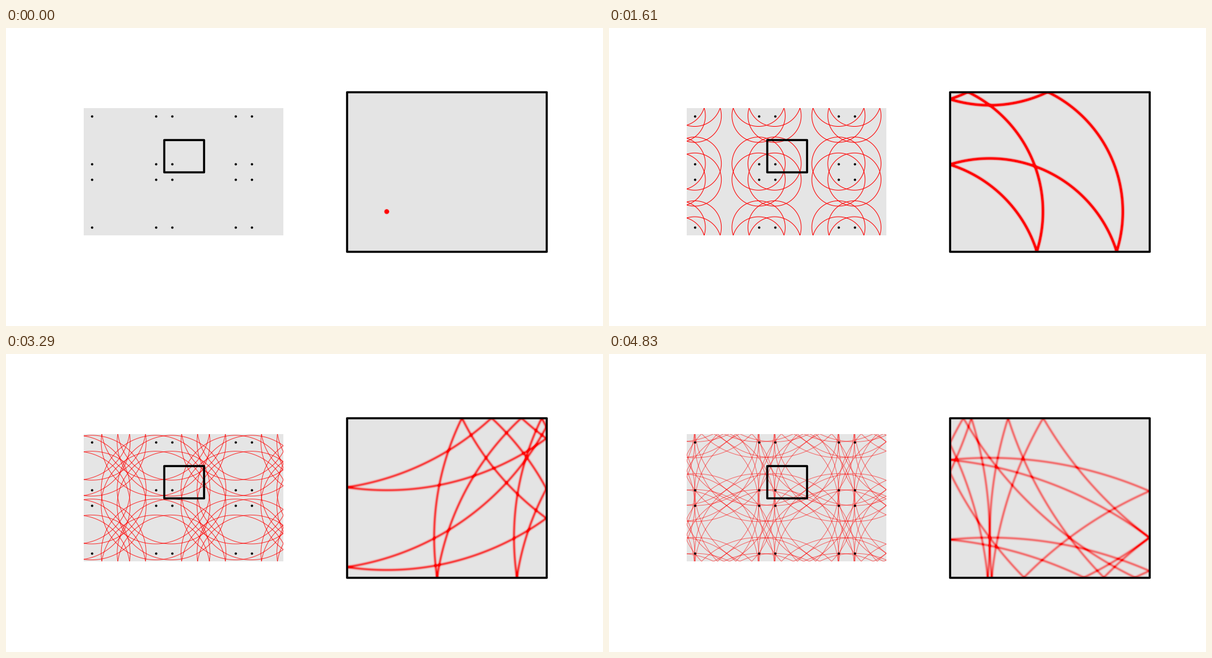
A matplotlib script that plays this animation: 960x480 px, repeating every 4900 ms.

```python
import numpy as np
import matplotlib.pyplot as plt
from matplotlib.animation import FuncAnimation
from matplotlib.collections import LineCollection
from matplotlib.patches import Rectangle

W, H, DPI = 960, 480, 100
FRAMES, STEP_MS = 70, 70
PX = 72 / DPI                      # one pixel in points
GREY = np.array([0.898] * 3, dtype=np.float32)
RED = np.array([1, 0, 0], dtype=np.float32)

# The room is 5 x 4 units with a source at (1, 1); mirror images repeat it.
MAX_R = 10
SPREAD = 1.4 / 64.2                # half width of the pulse, in units
UNIT = 12.84                       # pixels per unit in the overview
LEFT, BOTTOM = 125, 334
ROOM = (548, 103, 321, 257)


def mirrors(period, low, high):
    spots = [period * k + s for k in range(-3, 6) for s in (-1, 1)]
    return [p for p in spots if low <= p <= high]


def images(width, height):
    """Mirror sources whose waves can reach a width x height area."""
    return [(x, y)
            for x in mirrors(10, -MAX_R, width + MAX_R)
            for y in mirrors(8, -MAX_R, height + MAX_R)]


def strength(r):
    return 5.5 / (r + 0.3)


def frame_box(x, y, w, h):
    ax.add_patch(Rectangle((x, y), w, h, fill=False, ec="black",
                           lw=3.4 * PX, joinstyle="round", zorder=5))


fig = plt.figure(figsize=(W / DPI, H / DPI), dpi=DPI, facecolor="white")
ax = fig.add_axes([0, 0, 1, 1])
ax.axis("off")

# Overview of the unfolded rooms
panel = Rectangle((LEFT, 129), 321, 205, fc=GREY, lw=0, antialiased=False)
ax.add_patch(panel)

angle = np.linspace(0, 2 * np.pi, 241)
ring = np.column_stack([np.cos(angle), np.sin(angle)])
centres = np.array([(LEFT + x * UNIT, BOTTOM - y * UNIT)
                    for x, y in images(25, 16)])
waves = LineCollection([], colors="red", linewidths=1.0 * PX, zorder=2)
ax.add_collection(waves, autolim=False)
waves.set_clip_path(panel)

dots = np.array([(LEFT + x * UNIT, BOTTOM - y * UNIT)
                 for x in mirrors(10, 0, 25) for y in mirrors(8, 0, 16)])
ax.scatter(dots[:, 0] + 0.3, dots[:, 1] + 0.3, s=(3.8 * PX) ** 2,
           c="black", lw=0, zorder=4)
frame_box(LEFT + 10 * UNIT + 0.2, BOTTOM - 12 * UNIT + 0.3, 5 * UNIT, 4 * UNIT)

# Close view of one room
x0, y0, rw, rh = ROOM
gx, gy = np.meshgrid((np.arange(rw) + 0.5) * 5 / rw,
                     4 - (np.arange(rh) + 0.5) * 4 / rh)
dist = np.array([np.hypot(gx - x, gy - y) for x, y in images(5, 4)],
                dtype=np.float32)
view = ax.imshow(np.ones((rh, rw, 3)), extent=(x0, x0 + rw, y0 + rh, y0),
                 aspect="auto", interpolation="nearest", zorder=1)
frame_box(x0 + 0.2, y0 + 0.2, rw, rh)

ax.set_xlim(0, W)
ax.set_ylim(H, 0)


def draw(i):
    r = MAX_R * i / (FRAMES - 1)
    power = strength(r)

    waves.set_segments(list(centres[:, None] + ring * r * UNIT))
    waves.set_alpha(min(1, power))

    pulse = np.exp(-0.5 * ((dist - np.float32(r)) / np.float32(SPREAD)) ** 2)
    mix = np.clip(power * pulse.sum(axis=0), 0, 1)[..., None]
    view.set_data(GREY * (1 - mix) + RED * mix)
    return waves, view


anim = FuncAnimation(fig, draw, frames=FRAMES, interval=STEP_MS,
                     repeat=True, repeat_delay=0, blit=False)
plt.show()
```
